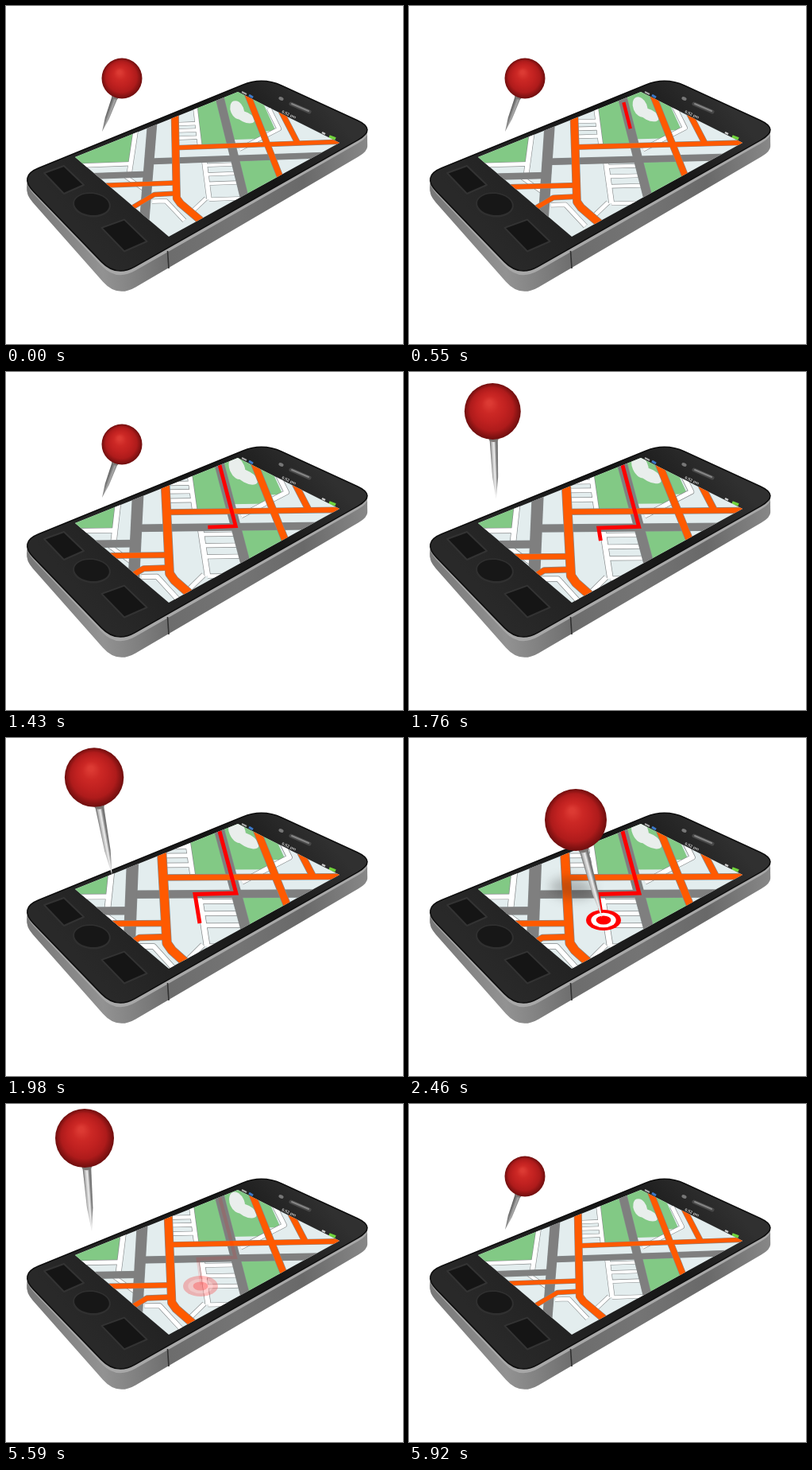
An HTML page with a canvas for the animation above (9120 ms loop, 500 by 425 pixels).

```html
<!DOCTYPE html>
<html lang="en">
<head>
<meta charset="utf-8">
<title>Phone map with pin</title>
<style>
html, body { margin: 0; width: 100%; height: 100%; overflow: hidden; background: #fff; }
canvas { display: block; width: 500px; height: 425px; }
</style>
</head>
<body>
<canvas id="stage" width="500" height="425"></canvas>
<script>
const ctx = document.getElementById('stage').getContext('2d');
const LOOP = 9120, STEP = 110, TAKEOFF = 1540, LANDED = 2460, LEAVE = 5260, REST = 5920;
const GREEN = '#82c985', ORANGE = '#ff5a00', GREY = '#7f7f7f', RED = '#ff0000', WHITE = '#fff';
const clamp = (v, a = 0, b = 1) => Math.min(b, Math.max(a, v));
const mix = (a, b, k) => a + (b - a) * k;
const mixAll = (a, b, k) => a.map((v, i) => mix(v, b[i], k));

function trace(points, closed) {
  ctx.beginPath();
  for (const [x, y] of points) ctx.lineTo(x, y);
  if (closed) ctx.closePath();
}
function fill(color) {
  ctx.fillStyle = color;
  ctx.fill();
}
function line(color, width, points) {
  trace(points);
  ctx.strokeStyle = color;
  ctx.lineWidth = width;
  ctx.stroke();
}
function ellipse(color, x, y, rx, ry, angle = 0) {
  ctx.beginPath();
  ctx.ellipse(x, y, rx, ry, angle, 0, 7);
  fill(color);
}
function gradient(x0, y0, x1, y1, ...colors) {
  const g = ctx.createLinearGradient(x0, y0, x1, y1);
  colors.forEach((c, i) => g.addColorStop(i / (colors.length - 1), c));
  return g;
}
function rounded(corners, cut) {
  const toward = (a, b) => mixAll(a, b, cut / Math.hypot(b[0] - a[0], b[1] - a[1]));
  ctx.beginPath();
  corners.forEach((c, i) => {
    const n = corners.length;
    ctx.lineTo(...toward(c, corners[(i + n - 1) % n]));
    ctx.quadraticCurveTo(...c, ...toward(c, corners[(i + 1) % n]));
  });
  ctx.closePath();
}

// Map grid in perspective: streets lean more the further right they stand.
const grid = (x, y) => [x + (x - 175) * .0024 * (y - 185), y - (x - 200) * .006];
const street = (x, width, y0 = 80, y1 = 310) => [width, [grid(x, y0), grid(x, y1)]];
const avenue = (y, width, x0, x1) => [width, [grid(x0, y), grid(x1, y)]];
const path = (width, ...points) => [width, points];

function block(color, x0, x1, y0, y1) {
  trace([grid(x0, y0), grid(x1, y0), grid(x1, y1), grid(x0, y1)], true);
  fill(color);
}
function roads(color, list) {
  for (const [w, points] of list) line('#85898a', w + 1.4, points);
  for (const [w, points] of list) line(color, w, points);
}

const whiteRoads = [
  street(237, 6, 80, 174), street(131, 7, 80, 214), street(241, 7, 198, 262),
  avenue(199, 6, 30, 131),
  ...[137, 148, 160].map(y => avenue(y, 5, 199, 237)),
  ...[206, 221, 236, 262].map(y => avenue(y, 5, 241, 287)),
  path(6, [224, 284], [248, 260]),
  path(6, [165, 262], [186, 262], [216, 295]),
  path(5, [122, 220], [157, 246]),
  path(6, [297, 181], [357, 150], [340, 116])
];
const greyRoads = [
  avenue(196.5, 9, 157, 470), avenue(217, 9, 50, 157), street(158.3, 14), street(287, 12)
];
const orangeRoads = [
  avenue(175.5, 7, 198, 480), avenue(233, 7, 90, 202),
  path(7, [125, 277], [168, 251], [204, 250]),
  street(343.5, 9), street(391.7, 8, 80, 174),
  path(11, grid(198.5, 80), grid(198.5, 258), [209, 267], [265, 317])
];
const route = [grid(287, 110), grid(287, 195.5), [238, 196.5], [244, 233]];
const screen = [[87, 190], [292, 108], [420, 172], [205, 290]];

function partial(points, length) {
  const out = [points[0]];
  for (let i = 1; i < points.length && length > 0; i++) {
    const [a, b] = [points[i - 1], points[i]];
    const size = Math.hypot(b[0] - a[0], b[1] - a[1]);
    out.push(mixAll(a, b, Math.min(1, length / size)));
    length -= size;
  }
  return out;
}

function drawMap(t) {
  const away = t < LEAVE ? 1 - clamp(t / 1980) : clamp((t - LEAVE) / (REST - LEAVE));
  const fade = clamp(1 - (t - LEAVE) / 440);
  ctx.save();
  trace(screen, true);
  ctx.clip();
  ctx.fillStyle = '#e3edee';
  ctx.fillRect(80, 100, 350, 200);

  ctx.save();
  ctx.transform(...mixAll([1, 0, 0, 1, 0, 0], [.815, -.025, -.03, .77, 57.5, 48], away));
  block(GREEN, 237, 287, 80, 173);
  block(GREEN, 287, 343, 80, 166);
  block(GREEN, 343, 366, 80, 154);
  block(GREEN, 287, 343, 200, 270);
  block(GREEN, 20, 131, 120, 197);
  ellipse('#e9eeec', 291, 117, 10, 16, -.4);
  ellipse('#e9eeec', 304, 129, 16, 8, .5);
  ctx.lineJoin = 'round';
  roads(WHITE, whiteRoads);
  roads(GREY, greyRoads);
  roads(ORANGE, orangeRoads);

  ctx.lineJoin = 'miter';
  ctx.globalAlpha = t < LEAVE ? 1 : fade / 2;
  const length = (t - 190) * .0955;
  if (length > 0) line(RED, 5, partial(route, length + 7));
  ctx.restore();

  if (t >= LANDED) {
    ctx.globalAlpha = fade;
    [RED, WHITE, RED].forEach((color, i) => ellipse(color, 245, 229, 22 - 6.3 * i, 13 - 3.7 * i));
  }
  ctx.restore();
}

// Left, far, right and near corners of the phone.
const faceCorners = [[16, 214], [323, 89], [467, 155], [139, 341]];
const baseCorners = [[16, 227], [323, 95], [467, 176], [140, 367]];

function drawPhone() {
  const metal = gradient(25, 230, 459, 190, '#777', '#929292', '#6d6d6d', '#747474', '#696969', '#888');
  for (let k = 1; k > .1; k -= .1) {
    rounded(mixAll(baseCorners.flat(), faceCorners.flat(), 1 - k).reduce(
      (list, v, i, all) => i % 2 ? [...list, [all[i - 1], v]] : list, []), 27);
    fill(k > .25 ? metal : '#a8a8a8');
  }
  rounded(faceCorners, 27);
  fill(gradient(130, 320, 380, 100, '#292929', '#202020', '#151515', '#303030'));
  ctx.strokeStyle = '#0d0d0d';
  ctx.lineWidth = 1.5;
  ctx.stroke();
  line('#303030', 1.6, [[203.5, 308], [205, 330]]);

  ctx.lineJoin = 'round';
  for (const [x, y, s] of [[73, 218, 1], [149, 288, 1.14]]) {
    trace([[x - 25 * s, y - 8 * s], [x, y - 17 * s], [x + 25 * s, y + 7 * s], [x, y + 18 * s]], true);
    fill('#151515');
    ctx.strokeStyle = '#333';
    ctx.lineWidth = 2;
    ctx.stroke();
  }
  ellipse('#303030', 108, 250, 24, 15.5, .1);
  ellipse('#171717', 108, 249.5, 22, 13.5, .1);

  ctx.lineCap = 'round';
  line('#484848', 5, [[359, 123], [382, 133]]);
  line('#858585', 2, [[360, 123], [381, 132]]);
  ctx.lineCap = 'butt';
  ellipse('#777', 346.5, 116.5, 3.2, 2.2, .4);
  line('#aaa', 2, [[297, 108], [303, 111]]);
  line('#3c78c8', 3, [[306, 112], [311, 115]]);
  line('#ccc', 2.5, [[398, 159], [402, 161]]);
  line('#70d23c', 4, [[407, 164], [415, 167]]);
  ctx.save();
  ctx.translate(347, 134);
  ctx.rotate(.42);
  ctx.font = 'bold 5px "Liberation Sans", Arial, sans-serif';
  ctx.fillStyle = '#c4c4c4';
  ctx.fillText('6:52 pm', 0, 0);
  ctx.restore();
}

// Poses: ball x, ball y, radius, tip x, tip y.
const resting = [146, 91, 25.5, 121, 158];
const raised = [99, 43, 37, 108, 160];
const planted = [210, 103, 39, 243, 226];

function pinPose(u) {
  if (u < 3) return mixAll(resting, raised, Math.sin(u / 3 * Math.PI / 2));
  const k = (u - 3) / 4;
  return raised.map((v, i) => mix(v, planted[i], k ** (i < 3 ? 1.6 : 1.2)));
}

function drawPin(t) {
  const u = clamp(t < LEAVE ? (t - TAKEOFF) / STEP : 6 - (t - LEAVE) / STEP, 0, 7);
  const [x, y, r, tx, ty] = pinPose(u);

  if (u > 3) {
    ctx.save();
    trace(screen, true);
    ctx.clip();
    ctx.filter = 'blur(7px)';
    ellipse(`rgba(40,40,40,${(u - 3) * .07})`, tx - 38, ty - 37, 28, 13, .1);
    ctx.restore();
  }

  const reach = Math.hypot(tx - x, ty - y), w = r * .155;
  ctx.save();
  ctx.translate(x, y);
  ctx.rotate(Math.atan2(ty - y, tx - x));
  trace([[r * .7, -w], [reach * .75, -w * .65], [reach, 0], [reach * .75, w * .65], [r * .7, w]], true);
  fill(u < 2 ? gradient(0, -w, 0, w, '#777', '#aaa', '#777', '#555')
    : gradient(0, -w, 0, w, '#777', '#777', '#eee', '#bbb', '#555'));
  ellipse('#7d7775', r * .98, 0, w * .7, w * 1.1);
  ctx.restore();

  const shade = ctx.createRadialGradient(x - r * .12, y - r * .3, r * .08, x, y, r);
  ['#dc3a33', '#cc2825', '#c02120', '#ae1b1b', '#6e0e0e'].forEach((c, i) => shade.addColorStop(i / 4, c));
  ellipse(shade, x, y, r, r);
}

function stepped(t) {
  if (t < LANDED) return Math.min(2310, Math.floor(t / STEP) * STEP);
  if (t < LEAVE) return LANDED;
  return Math.min(REST, LEAVE + Math.floor((t - LEAVE) / STEP) * STEP);
}

const start = performance.now();
function frame() {
  const t = stepped((performance.now() - start) % LOOP);
  ctx.fillStyle = WHITE;
  ctx.fillRect(0, 0, 500, 425);
  drawPhone();
  drawMap(t);
  drawPin(t);
  requestAnimationFrame(frame);
}
frame();
</script>
</body>
</html>
```
